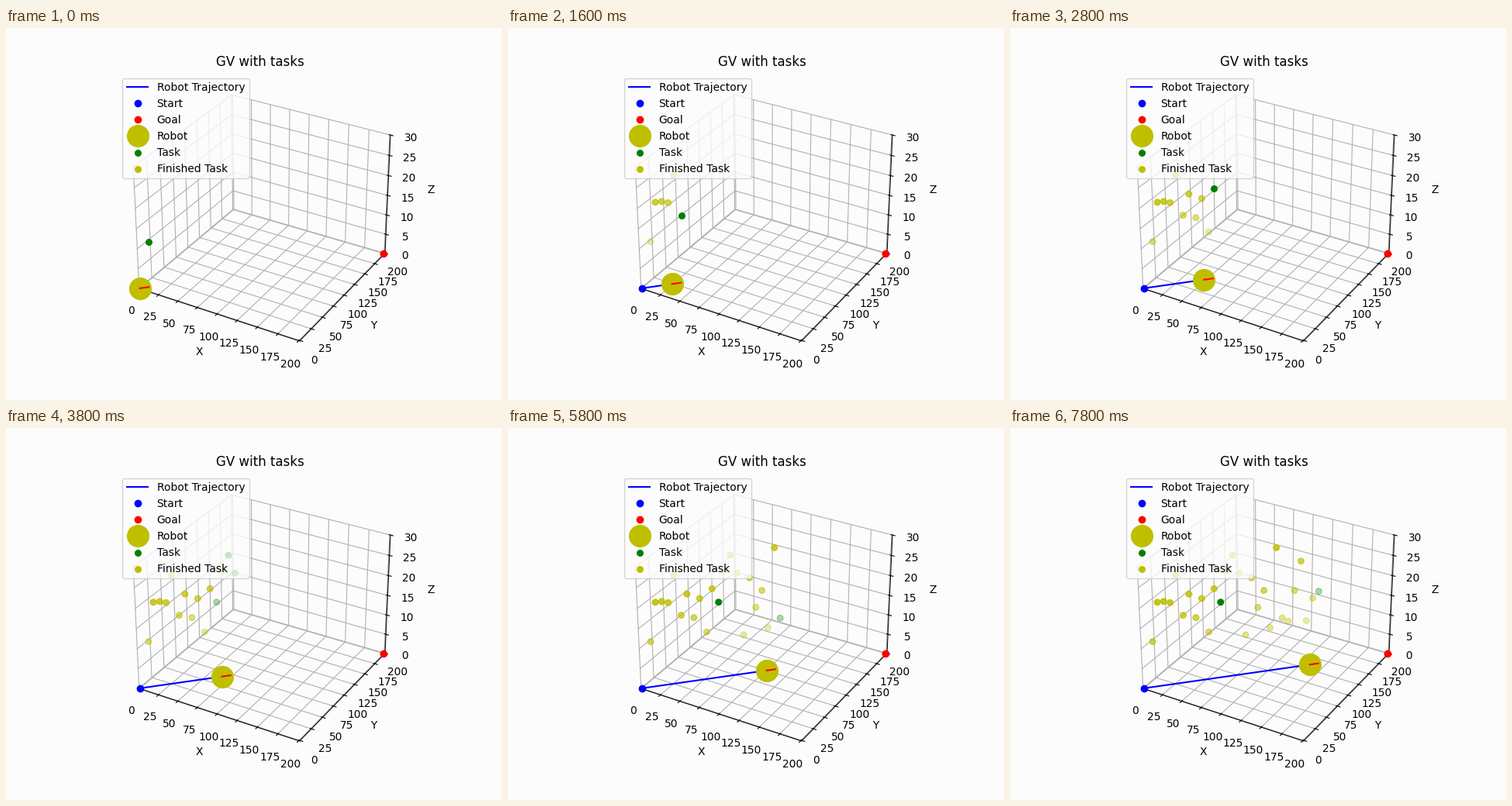
Recreate the animation shown at these times as a matplotlib script. Size 640 by 480 pixels, loop 8000 ms.

```python
import numpy as np
import matplotlib.pyplot as plt
from matplotlib.animation import FuncAnimation

W, H, DPI = 640, 480, 100
FRAMES, STEP_MS = 40, 200
BACK = "#fcfcfc"

START, GOAL = 0, 200
HEADING = 10 * np.cos(np.pi / 4)

# The robot drives up the diagonal x = y, slower at first
KEY_FRAMES = (0, 8, 14, 25, 39)
KEY_SPOTS = (0, 24, 48, 86.7, 134.5)

# Tasks hang above the diagonal at even spacing
HEIGHTS = np.array([11.5, 21, 21, 20.5, 27, 17, 22, 16, 20.5, 12,
                    22.5, 19, 26.5, 30, 25.5, 10, 24, 16.5, 20.5, 11,
                    30.5, 13, 12, 19.5, 26.5, 11.5, 17, 18.5])
ORDER = np.arange(len(HEIGHTS))
ALONG = 8.5 + 4.9 * ORDER
SEE_RANGE, WORK_RANGE = 12.3, 6.2
SKIPPED = 11

fig = plt.figure(figsize=(W / DPI, H / DPI), dpi=DPI, facecolor=BACK)
ax = fig.add_subplot(projection="3d", facecolor=BACK)
ax.set(xlim=(START - 1, GOAL + 1), ylim=(START - 1, GOAL + 1), zlim=(0, 30),
       xlabel="X", ylabel="Y", zlabel="Z", title="GV with tasks")
for axis in (ax.xaxis, ax.yaxis, ax.zaxis):
    axis.set_pane_color((1, 1, 1, 0))

path, = ax.plot([], [], [], "b-", label="Robot Trajectory")
ax.plot([START], [START], [0], "bo", label="Start")
ax.plot([GOAL], [GOAL], [0], "ro", label="Goal")
robot, = ax.plot([START], [START], [0], "yo", markersize=20, label="Robot")
nose, = ax.plot([], [], [], "r-")


def scatter(along, height, color, label=None):
    return ax.scatter(along, along, height, c=color, s=30, label=label)


dots = [scatter([START], [0], "g", "Task"),
        scatter([START], [0], "y", "Finished Task")]
ax.legend(loc="upper left", facecolor=BACK)


def diagonal(line, *stops):
    line.set_data_3d(stops, stops, [0] * len(stops))


def update(i):
    pos = np.interp(i, KEY_FRAMES, KEY_SPOTS)
    diagonal(path, START, pos)
    diagonal(robot, pos)
    diagonal(nose, pos, pos + HEADING)

    while dots:
        dots.pop().remove()
    seen = ALONG <= pos + SEE_RANGE
    finished = (ALONG <= pos + WORK_RANGE) & (ORDER != SKIPPED)
    for color, mask in (("g", seen & ~finished), ("y", finished)):
        if mask.any():
            dots.append(scatter(ALONG[mask], HEIGHTS[mask], color))
    return [path, robot, nose, *dots]


anim = FuncAnimation(fig, update, frames=FRAMES, interval=STEP_MS,
                     repeat=True, repeat_delay=0, blit=False)
plt.show()
```
